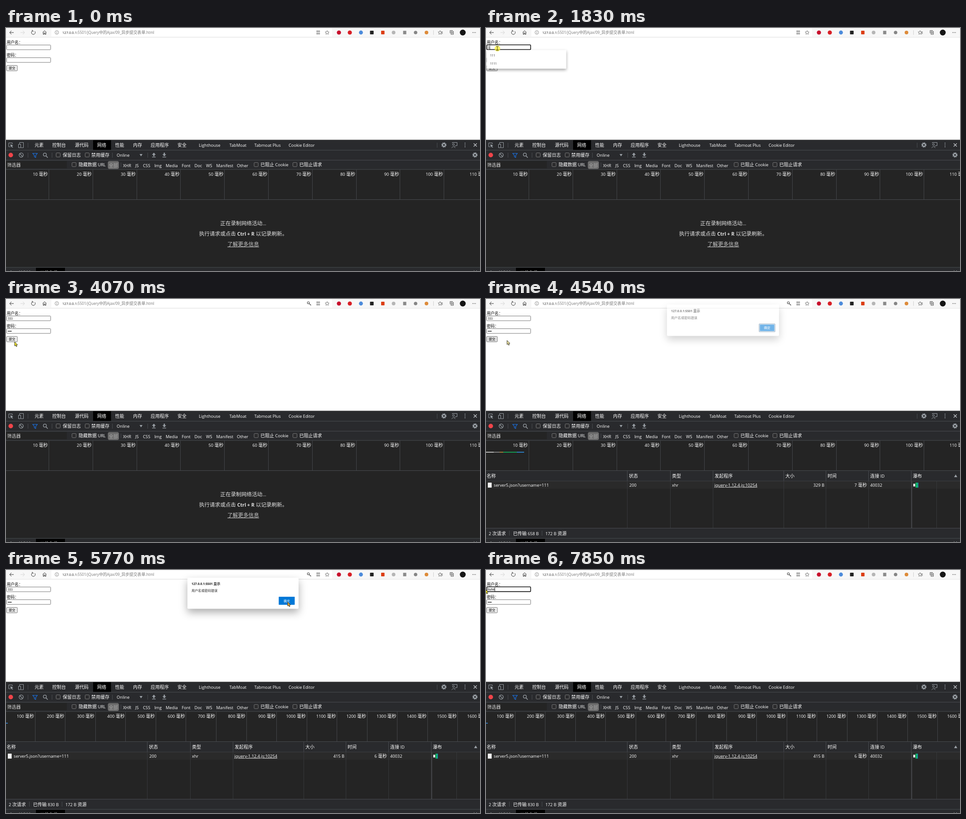
Animation, 1045 px wide and 536 px high, one loop 8000 ms. Source, as an HTML page:

```html
<!DOCTYPE html>
<html lang="zh-CN">
<head>
<meta charset="utf-8">
<title>异步提交表单</title>
<style>
html, body { margin: 0; width: 100%; height: 100%; overflow: hidden; background: #fff; }
svg { display: block; width: 100%; height: 100%; }
text { font-family: "Open Sans", "Noto Sans CJK SC", "Noto Sans CJK", "Noto Sans", sans-serif; white-space: pre; }
.plain { font-family: "Liberation Sans", Arial, sans-serif; }
.popup { filter: drop-shadow(0 3px 3px rgba(0, 0, 0, .35)); }
.card { filter: drop-shadow(0 8px 9px rgba(0, 0, 0, .32)); }
</style>
</head>
<body>
<svg id="stage" viewBox="0 0 1045 536" preserveAspectRatio="none"></svg>
<script>
const LOOP = 8000;
const stage = document.getElementById('stage');
let into = stage;

function el(tag, attrs, parent = into) {
  const e = document.createElementNS('http://www.w3.org/2000/svg', tag);
  for (const k in attrs) e.setAttribute(k, attrs[k]);
  return parent.appendChild(e);
}
function group(draw, attrs = {}) {
  const g = el('g', attrs), outer = into;
  into = g;
  draw();
  into = outer;
  return g;
}
const rect = (x, y, width, height, fill, more) => el('rect', { x, y, width, height, fill, ...more });
const dot = (cx, cy, r, fill, more) => el('circle', { cx, cy, r, fill, ...more });
const path = (d, stroke = '#333', more) =>
  el('path', { d, stroke, fill: 'none', 'stroke-width': 1, ...more });

// Latin runs are set a little smaller than the CJK runs beside them
function label(x, y, str, size = 10, fill = '#fff', more) {
  const t = el('text', { x, y, fill, 'font-size': size, ...more });
  for (const run of str.match(/[\u2e80-\uffff]+|[^\u2e80-\uffff]+/g) || []) {
    const cjk = run.charCodeAt(0) >= 0x2e80;
    el('tspan', { 'font-size': cjk ? size : size * .925 }, t).textContent = run;
  }
  return t;
}
const END = { 'text-anchor': 'end' }, MID = { 'text-anchor': 'middle' };
const LINE = '#494c50', BAR = '#292a2d', BODY = '#242424', ICON = '#9aa0a6';
const vline = (x, y1, y2, c = LINE) => rect(x, y1, 1, y2 - y1, c);
const hline = (y, c = LINE) => rect(0, y, 1045, 1, c);

// ---------- page ----------
rect(0, 0, 1045, 536, '#fff');

function inputBox(y) {
  const box = rect(1.5, y + .5, 97, 10.4, '#fff', { rx: 1.2, stroke: '#767676' });
  const ring = rect(1.8, y + .2, 96.6, 10.4, '#fff', { rx: 1.2, stroke: '#101010', 'stroke-width': 1.6 });
  return { box, ring };
}
label(1.5, 34.5, '用户名：', 8.8, '#000');
label(1.5, 63, '密码：', 8.8, '#000');
const nameBox = inputBox(37), passBox = inputBox(65);
const selection = rect(4, 38.5, 11.5, 8.5, '#2f7fe0');
const nameText = el('text', { x: 4, y: 45.2, 'font-size': 7.2, class: 'plain' });
const dots = [5.4, 8.2, 11].map(x => dot(x, 71.1, 1.15, '#000'));
const caret = rect(4, 38.5, .8, 8.5, '#000');
const button = rect(1.5, 82.5, 23.5, 12, '#efefef', { rx: 1.3, stroke: '#767676' });
label(13.2, 91.2, '提交', 7.3, '#000', MID);

// ---------- browser bar ----------
rect(0, 0, 1045, 20, '#f7f7f7');
rect(100, 1, 619, 18, '#fff', { rx: 2 });
hline(20, '#e4e4e4');
path('M17 10H8M12 6L8 10L12 14');
path('M32 10H41M37 6L41 10L37 14', '#d4d4d4');
path('M63.5 7.3A4.2 4.2 0 1 1 58.5 6.2M58 4.2V7H61');
path('M81 9.5L85 6L89 9.5M82 9V14H84V11H86V14H88V9');
dot(112, 9.8, 4, 'none', { stroke: '#777', 'stroke-width': .8 });
path('M112 9.3V12M112 7.3V8.3', '#777');
label(124, 13, '127.0.0.1:', 8.2, '#222');
label(158, 13, '5501/jQuery中的Ajax/09_异步提交表单.html', 8.8, '#777');

const keyIcon = group(() => {
  dot(666.6, 8.3, 2.3, 'none', { stroke: '#555', 'stroke-width': 1.2 });
  path('M668.3 10L672.5 14', '#555', { 'stroke-width': 1.5 });
});
for (const [x, y] of [[685, 6], [689, 6], [685, 11], [689, 11]])
  rect(x, y, 2.6, 2.6, 'none', { stroke: '#666', 'stroke-width': .8 });
const star = (x, y) => path(`M${x} ${y - 4.3}l1.3 2.8 3 .4-2.2 2 .6 3-2.7-1.5-2.7 1.5 .6-3-2.2-2 3-.4z`, '#555', { 'stroke-width': .8 });
star(708, 10);
dot(734, 10, 4.6, '#c70d2c');
dot(758, 10, 4.6, '#d81f26');
dot(782.5, 10, 4.4, '#4c8bdb');
rect(802.5, 6, 8, 8, '#222', { rx: 1 });
rect(827, 6, 7.5, 8, '#dc3e15', { rx: 1 });
dot(854.5, 10, 4, '#b5b5b5');
rect(875.5, 6.2, 7, 7.6, '#8a8a8a');
dot(903, 10, 3.8, '#858585');
dot(927, 10, 4, '#dd8b3a');
vline(942, 5, 15, '#d0d0d0');
star(957, 10);
path('M959.5 9H963M960.5 12H963', '#444');
path('M979 11.5V5.5H985M981 7.5H986.5V14H981zM982 10.7H985.5M983.7 9V12.5', '#444', { 'stroke-width': .9 });
dot(1007, 10, 6.5, '#151515');
for (const x of [1029, 1032, 1035]) dot(x, 10, .8, '#333');

// ---------- developer tools ----------
rect(0, 247, 1045, 289, BAR);
rect(0, 312, 1045, 216, BODY);
hline(246.5, '#3c3c3f');
hline(269); hline(291); hline(311.5);
rect(192, 247.5, 39.5, 21.5, '#000');

function gear(x, y) {
  dot(x, y, 3.2, 'none', { stroke: ICON, 'stroke-width': 2.4 });
  dot(x, y, 4.9, 'none', { stroke: ICON, 'stroke-width': 1.6, 'stroke-dasharray': '2.2 1.65' });
}
path('M14 256V253.5H6V262H9', ICON);
el('path', { d: 'M9.5 256.5L16 259L13 260.2L15.5 263L14.5 264L12 261.2L11 264z', fill: ICON });
path('M30 256V252.5H38.5V264H33M27.5 256.5H32.5V264H27.5z', ICON);
for (const [x, str] of [[63, '元素'], [102, '控制台'], [152, '源代码'], [201, '网络'], [240.5, '性能'],
  [280, '内存'], [319, '应用程序'], [378, '安全'], [425, 'Lighthouse'], [492.5, 'TabMoat'],
  [547.5, 'Tabmoat Plus'], [623, 'Cookie Editor']]) label(x, 262, str);
vline(48, 253, 264); vline(950, 253, 264);
gear(965.5, 258);
path('M984 254V252.5H994.5V259.5H991L989 262', ICON);
dot(986.5, 257, 2, 'none', { stroke: ICON });
path('M982.5 264.5Q986.5 258.5 990.5 264.5', ICON);
for (const y of [254, 258, 262]) dot(1012, y, 1.1, ICON);
path('M1031 254.5L1038 261.5M1038 254.5L1031 261.5', '#c4c7cb', { 'stroke-width': 1.3 });

dot(10.5, 280.3, 5, '#f0444a');
dot(33.5, 280.3, 4.6, 'none', { stroke: ICON, 'stroke-width': 1.3 });
path('M30.3 277L36.7 283.6', ICON, { 'stroke-width': 1.3 });
path('M59 276.5H69L65.5 281V285.5L62.5 284V281z', '#1a73e8', { 'stroke-width': 1.2 });
dot(85.7, 279.3, 3.4, 'none', { stroke: ICON, 'stroke-width': 1.3 });
path('M88.2 282L92 286', ICON, { 'stroke-width': 1.5 });
for (const x of [48, 101, 234, 312]) vline(x, 275, 286);
const check = (x, y) => rect(x + .5, y + .5, 9, 9, '#2b2b2d', { rx: 1.3, stroke: '#7b7b7b' });
check(110, 275); check(174, 275);
label(125, 284, '保留日志'); label(188, 284, '禁用缓存'); label(244, 284, 'Online');
el('path', { d: 'M294.5 278H301L297.7 283z', fill: ICON });
el('path', { d: 'M326 275L330.2 279.8H327.3V283H324.7V279.8H321.8zM322 284H330V285.2H322z', fill: ICON });
el('path', { d: 'M349 283L353.2 278.4H350.3V275H347.7V278.4H344.8zM345 284H353V285.2H345z', fill: ICON });
gear(1034, 280);

rect(0, 293.5, 134, 16, BODY);
label(2.5, 306.3, '筛选器', 10, '#d8d8d8');
check(145, 296.3); check(546.5, 296.3); check(632, 296.3);
label(160, 305.3, '隐藏数据 URL');
label(561, 305.3, '已阻止 Cookie');
label(646.5, 305.3, '已阻止请求');
rect(224.5, 293.5, 24.5, 17.5, '#6d6d6d', { rx: 4 });
label(236.8, 306.6, '全部', 10, '#a6a6a6', MID);
vline(253, 297, 307);
for (const [x, str] of [[258, 'XHR'], [285, 'JS'], [302, 'CSS'], [327, 'Img'], [352, 'Media'], [387.5, 'Font'],
  [415.5, 'Doc'], [441, 'WS'], [463.5, 'Manifest'], [509, 'Other']]) label(x, 306.5, str);

// timeline ruler: first line, pitch, unit per line
const ruler = (first, pitch, unit) => group(() => {
  for (let i = 0; first + (i - 1) * pitch < 1045; i++) {
    const x = first + i * pitch;
    vline(Math.floor(x), 312, 378, '#444649');
    label(x - 2.2, 326, (i + 1) * unit + ' 毫秒', 10, '#fff', END);
  }
});
const shortRuler = ruler(94.5, 96.8, 10), longRuler = ruler(64.2, 66.55, 100);
hline(378);

const idle = group(() => {
  label(523, 435.3, '正在录制网络活动...', 11.6, '#e4e4e4', MID);
  const hint = label(523, 458.3, '执行请求或点击 ', 11.6, '#e4e4e4', MID);
  el('tspan', { 'font-weight': 700, 'font-size': 10.6 }, hint).textContent = 'Ctrl + R';
  el('tspan', {}, hint).textContent = ' 以记录刷新。';
  label(523, 481.3, '了解更多信息', 11.6, '#c6c6c6', { ...MID, 'text-decoration': 'underline' });
});

const COLS = [311, 406, 500, 656, 749, 843, 937];
const FAINT = '#36383b';
const table = group(() => {
  rect(0, 379, 1045, 22, BAR);
  hline(401, '#3d3f42');
  rect(0, 402, 1045, 16.5, '#2a2a2a');
  for (const x of COLS) {
    vline(x, 379, 401);
    vline(x, 402, 505, FAINT);
  }
  rect(937.5, 402, 2, 103, '#434548');
  vline(993, 402, 505, FAINT);
  ['名称', '状态', '类型', '发起程序', '大小', '时间', '连接 ID', '瀑布'].forEach((str, i) =>
    label(i ? COLS[i - 1] + 4 : 1.5, 394, str));
  el('path', { d: 'M1032 393L1035.5 387L1039 393z', fill: ICON });
  rect(4, 405, 8.5, 11, '#f4f4f4', { rx: .6 });
  label(17, 413.8, 'server5.json?username=111');
  label(316, 413.8, '200');
  label(410, 413.8, 'xhr');
  label(503.5, 413.8, 'jquery-1.12.4.js:10254', 10, '#fff', { 'text-decoration': 'underline' });
  label(847, 413.8, '40032');
  rect(942, 407.5, 4.2, 6, '#f0f0f0');
  rect(0, 505, 1045, 23, BAR);
  hline(505);
  label(6, 520.6, '2 次请求');
  label(131, 520.6, '172 B 资源');
  vline(51, 511, 522); vline(123, 511, 522);
});
// values that differ between the two requests
const result = (size, time, sent, green) => group(() => {
  label(746, 413.8, size, 10, '#fff', END);
  label(840, 413.8, time, 10, '#fff', END);
  label(59.5, 520.6, '已传输 ' + sent);
  rect(947, 405, green, 11, '#10b464');
  rect(947 + green, 405, 1.3, 11, '#1c9ad6');
});
const firstResult = group(() => {
  result('329 B', '7 毫秒', '658 B', 4.8);
  let x = 0;
  for (const [w, c] of [[17, '#d5d5d5'], [13, '#8d8d8d'], [8, '#b98a3c'], [30, '#12b05c'], [16, '#2d8fe0']]) {
    rect(x, 337, w, 1.7, c);
    x += w;
  }
});
const secondResult = group(() => {
  result('415 B', '6 毫秒', '830 B', 3.8);
  rect(0, 337, 4, 1.7, '#2d7fd0');
});

rect(0, 528, 1045, 8, BAR);
hline(527.5);
rect(66, 529, 64, 7, '#000');
dot(11, 536, 1.1, ICON);
label(28, 543.6, '控制台');
label(75, 543.6, '网络条件', 10, '#fff', { 'font-weight': 600 });
path('M1031.5 535L1038 541M1038 535L1031.5 541', '#c4c7cb');

// ---------- overlays ----------
const popup = items => group(() => {
  rect(1.5, 48.5, 175.5, items.length * 18.6 + 4, '#fff', { rx: 1 });
  items.forEach((str, i) => label(9, 62.5 + i * 18.6, str, 7, '#222'));
}, { class: 'popup' });
const allNames = popup(['guest', 'linhefan', 'LuQingHe', '3058271946@zv.test', 'eee', 'lqh']);
const oneNames = popup(['111', '1111']);
const linNames = popup(['linhefan']);

let okRing;
const dialog = group(() => {
  rect(400, 17, 245, 68.5, '#fff', { rx: 2, class: 'card' });
  label(409, 33.2, '127.0.0.1:5501 显示', 7.4, '#1a1a1a', { 'font-weight': 700 });
  label(409, 48.4, '用户名或密码错误', 7.15, '#222');
  rect(601.3, 59, 35.2, 17.7, '#0078d7', { rx: .8 });
  okRing = group(() => {
    rect(602.4, 60.1, 33, 15.5, 'none', { stroke: '#fff', 'stroke-width': 1.1 });
    rect(601.5, 59.2, 34.8, 17.3, 'none', { stroke: '#5d6f80', 'stroke-width': .9, rx: .8 });
  });
  label(619, 70.6, '确定', 7, '#fff', MID);
});

const pointer = group(() => {});
into = pointer;
const halo = dot(.2, .3, 6.3, '#fbf33c', { opacity: .75 });
const arrow = el('path', { d: 'M.4 .4V9.4L2.4 7.6L4 11L5.6 10.2L4.1 7H6.9z', stroke: '#2b2b1c', 'stroke-width': .9, 'stroke-linejoin': 'round' });
const beam = path('M-3 -4.2H-.8L0 -3.6L.8 -4.2H3M0 -3.6V3.6M-3 4.2H-.8L0 3.6L.8 4.2H3', '#55500f', { 'stroke-width': 1.1 });

// ---------- motion ----------
const TRACK = [[70, 757, 447], [820, 25, 45], [2200, 25, 45], [2450, 25, 173], [2580, 25, 173], [2750, 25, 69],
  [3300, 25, 69], [3610, 18, 138], [3770, 18, 138], [4070, 19, 95.5], [4220, 17, 88], [4460, 17, 88],
  [4550, 46, 91], [4620, 230, 101], [5290, 620.5, 70], [5790, 620.5, 70], [6230, 18, 42], [6460, 18, 42], [6540, -2, 42]];
const TICK = 76.6;

function pointerAt(t) {
  const i = TRACK.findIndex(p => p[0] > t);
  if (i < 0) return TRACK[TRACK.length - 1].slice(1);
  if (i === 0) return TRACK[0].slice(1);
  const [t0, x0, y0] = TRACK[i - 1], [t1, x1, y1] = TRACK[i];
  const k = 1 - (1 - (t - t0) / (t1 - t0)) ** 2;
  return [x0 + (x1 - x0) * k, y0 + (y1 - y0) * k];
}
// true inside any of the [from, to) pairs
const within = (t, ...spans) => spans.some(([a, b = LOOP]) => t >= a && t < b);
const show = (e, on) => { e.style.display = on ? '' : 'none'; };
const count = (t, times) => times.filter(at => t >= at).length;

// opacity, lift and scale of the dialog as it opens and closes
function dialogPose(t) {
  if (t < 4610) return [.55, -4.8, 1.008];
  if (t < 4690) return [.85, -1.5, 1.003];
  return t < 5850 ? [1, 0, 1] : [.5, -3, 1];
}

function render(t) {
  const typed = t < 7530 ? '111'.slice(0, count(t, [1830, 1980, 2130]))
    : 'liuhe'.slice(0, count(t, [7530, 7610, 7690, 7770, 7850]));
  if (nameText.textContent !== typed) nameText.textContent = typed;
  const selected = within(t, [6540, 7530]);
  show(selection, selected);
  nameText.setAttribute('fill', selected ? '#fff' : '#000');

  const nameFocus = within(t, [820, 2450], [6460]);
  const passFocus = within(t, [2980, 3610]);
  show(nameBox.ring, nameFocus);
  show(nameBox.box, !nameFocus);
  show(passBox.ring, passFocus);
  show(passBox.box, !passFocus);
  const entered = count(t, [3150, 3230, 3300]);
  dots.forEach((d, i) => show(d, i < entered));
  show(keyIcon, t >= 3150);
  show(caret, within(t, [970, 1510], [1830, 2450], [2980, 3610], [7530]));
  caret.setAttribute('x', passFocus ? 4 + entered * 2.8 : 4 + (typed ? nameText.getComputedTextLength() : 0));
  caret.setAttribute('y', passFocus ? 66.5 : 38.5);
  button.setAttribute('fill', within(t, [4140, 4560]) ? '#e2e2e2' : '#efefef');

  show(allNames, within(t, [970, 1830]));
  allNames.style.opacity = t < 1060 ? .45 : 1;
  show(oneNames, within(t, [1830, 2450], [6460, 7530]));
  show(linNames, within(t, [7530, 7690]));

  const sent = t >= 4380, renewed = t >= 5690;
  show(idle, !sent);
  show(table, sent);
  show(firstResult, sent && !renewed);
  show(secondResult, renewed);
  show(shortRuler, !renewed);
  show(longRuler, renewed);

  const [opacity, lift, scale] = dialogPose(t);
  show(dialog, within(t, [4530, 5920]));
  dialog.style.opacity = opacity;
  dialog.setAttribute('transform', `translate(522.5 ${lift}) scale(${scale}) translate(-522.5 0)`);
  show(okRing, !renewed);

  const held = Math.floor(t / TICK + .35) * TICK + 25;
  const [x, y] = pointerAt(held);
  const text = within(t, [820, 2230], [2710, 3370], [6210, 6540]);
  show(pointer, t >= 70);
  pointer.setAttribute('transform', `translate(${x.toFixed(1)} ${y.toFixed(1)})`);
  show(beam, text);
  show(arrow, !text);
  show(halo, within(t, [70, 2230], [2440, 2600]));
  arrow.setAttribute('fill', within(t, [4450, 4690]) ? '#efe3a0' : within(t, [5450, 5850]) ? '#f0a830' : '#f3e527');
  beam.setAttribute('stroke', within(t, [2830, 3150]) ? '#b39a10' : '#55500f');
}

let start = null;
function loop(now) {
  if (start === null) start = now;
  render((now - start) % LOOP);
  requestAnimationFrame(loop);
}
render(0);
requestAnimationFrame(loop);
</script>
</body>
</html>
```
